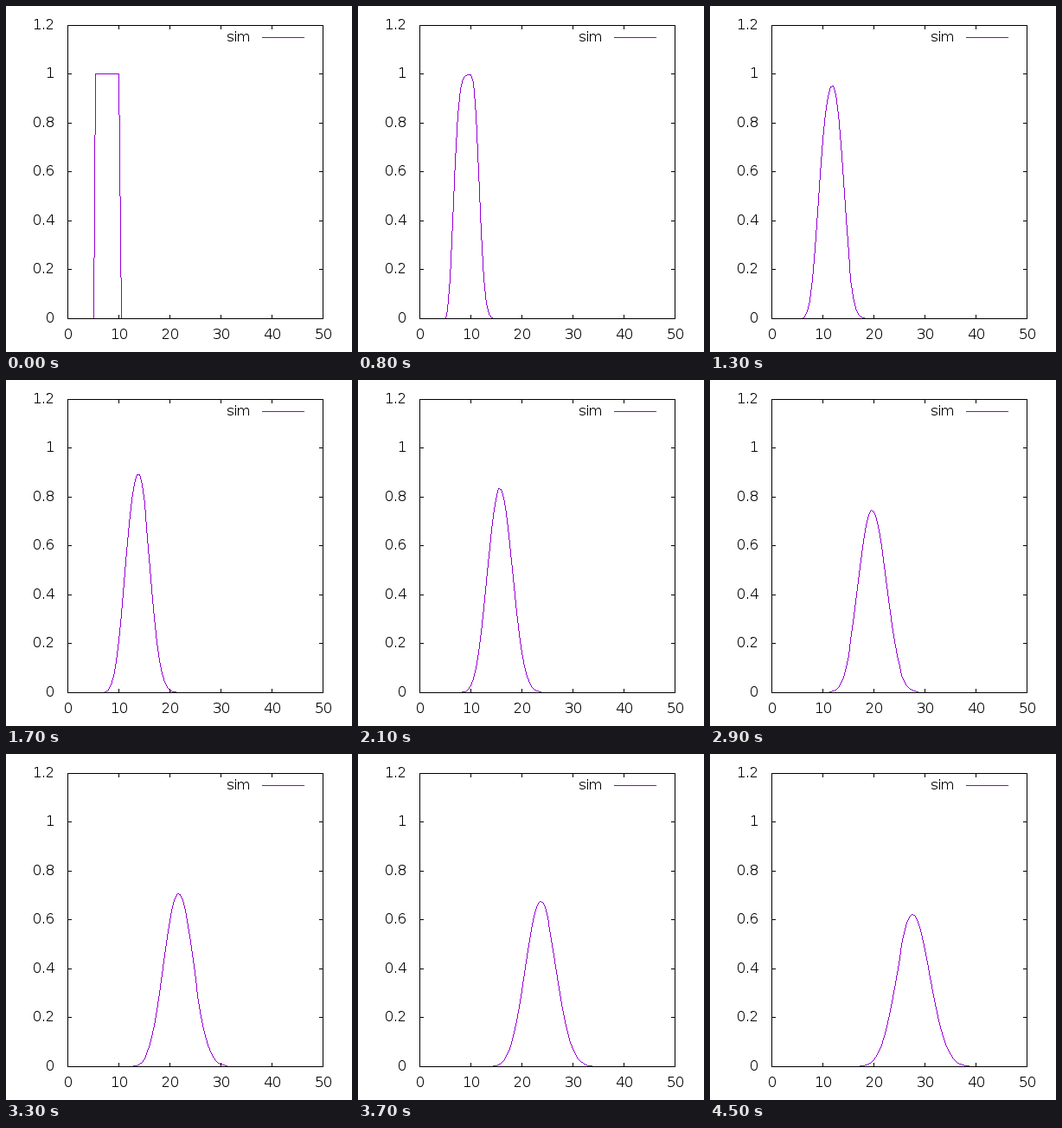
Animation, 400 px wide and 400 px high, one loop 4.6 s. Source, as a matplotlib script:

```python
import numpy as np
import matplotlib.pyplot as plt
from matplotlib.animation import FuncAnimation
from matplotlib.colors import to_rgba

SIZE, DPI = 400, 100
PX = 72 / DPI                       # one pixel in points
LEFT, RIGHT, TOP, BOTTOM = 71, 366, 22, 361
X_MAX, Y_MAX = 50, 1.2
PURPLE = "#9400d3"
FRAMES, STEP_MS, HOLD = 46, 100, 5
DX, COURANT, SUBSTEPS = 0.5, 0.2, 5

plt.rcParams.update({
    "font.family": "DejaVu Sans",
    "text.hinting": "native",
    "text.hinting_factor": 1,
})


def to_col(x):
    return LEFT + np.floor(np.asarray(x) * (RIGHT - LEFT) / X_MAX + 0.5).astype(int)


def to_row(y):
    height = np.asarray(y) * (BOTTOM - TOP) / Y_MAX
    return BOTTOM - np.floor(height + 0.5 + 1e-9).astype(int)


def simulate(count):
    """First-order upwind advection of a square pulse."""
    u = np.where((grid > 5.1) & (grid < 10.1), 1.0, 0.0)
    states = [u.copy()]
    for _ in range(count - 1):
        for _ in range(SUBSTEPS):
            u[1:] -= COURANT * (u[1:] - u[:-1])
        states.append(u.copy())
    return states


def line_pixels(x0, y0, x1, y1):
    """Pixels of a one-pixel line, walked along its longer axis."""
    if abs(y1 - y0) > abs(x1 - x0):
        ys, xs = line_pixels(y0, x0, y1, x1)
        return xs, ys
    if x1 < x0:
        x0, y0, x1, y1 = x1, y1, x0, y0
    steps = np.arange(x1 - x0 + 1)
    rise = np.floor(abs(y1 - y0) * steps / max(x1 - x0, 1) + 0.5).astype(int)
    return x0 + steps, y0 + np.sign(y1 - y0) * rise


def rasterize(u):
    """Transparent layer holding the crisp polyline of one state."""
    layer = np.zeros((SIZE, SIZE, 4))
    cols, rows = to_col(grid), to_row(u)
    for seg in zip(cols[:-1], rows[:-1], cols[1:], rows[1:]):
        xs, ys = line_pixels(*seg)
        layer[ys, xs] = to_rgba(PURPLE)
    return layer


fig = plt.figure(figsize=(SIZE / DPI, SIZE / DPI), dpi=DPI, facecolor="white")
ax = fig.add_axes([0, 0, 1, 1])
ax.axis("off")


def stroke(xs, ys, color="black"):
    ax.plot(xs, ys, color=color, lw=PX, antialiased=False, snap=False,
            solid_capstyle="projecting", zorder=3)


def label(x, baseline, text, ha):
    ax.text(x, baseline, text, ha=ha, va="baseline", fontsize=16 * PX,
            color="black")


stroke([LEFT, RIGHT, RIGHT, LEFT, LEFT], [TOP, TOP, BOTTOM, BOTTOM, TOP])

TICK = 4
for value in range(0, 51, 10):
    col = to_col(value)
    stroke([col, col], [BOTTOM, BOTTOM - TICK])
    stroke([col, col], [TOP, TOP + TICK])
    label(col + 0.5, 384.5, str(value), "center")

for i in range(7):
    row = to_row(i / 5)
    stroke([LEFT, LEFT + TICK], [row, row])
    stroke([RIGHT, RIGHT - TICK], [row, row])
    label(55.5, row + 4.5, f"{i / 5:g}", "right")

label(281.8, 40.5, "sim", "right")
stroke([296, 344], [36, 36], PURPLE)

grid = np.arange(0, X_MAX + DX / 2, DX)
states = simulate(FRAMES - HOLD)
edge = SIZE - 0.5
curve = ax.imshow(rasterize(states[0]), extent=(-0.5, edge, edge, -0.5),
                  interpolation="nearest", aspect="auto", zorder=2)
ax.set_xlim(-0.5, edge)
ax.set_ylim(edge, -0.5)


def update(frame):
    curve.set_data(rasterize(states[max(0, frame - HOLD)]))
    return (curve,)


anim = FuncAnimation(fig, update, frames=FRAMES, interval=STEP_MS,
                     repeat=True, repeat_delay=0, blit=False)
plt.show()
```
